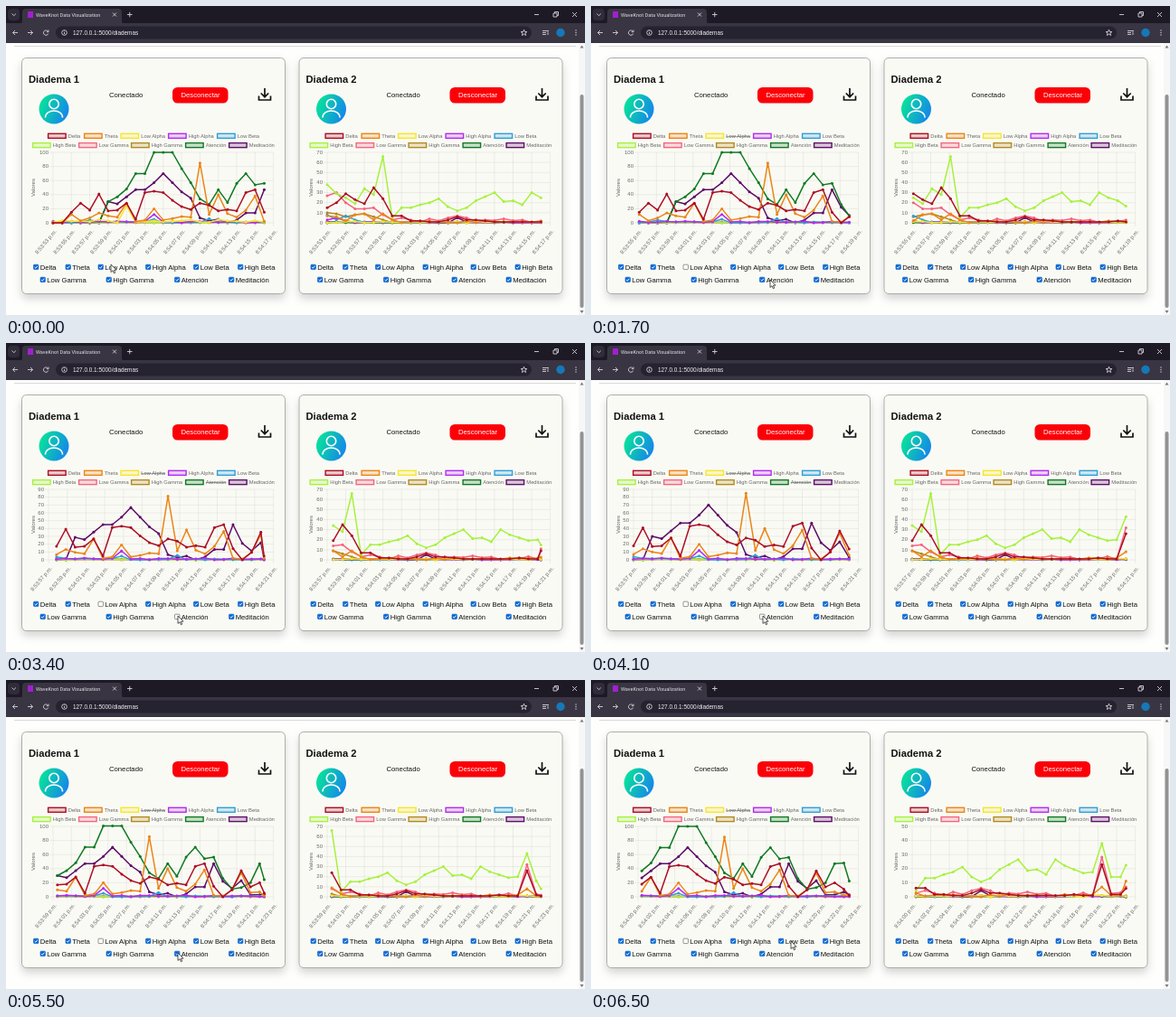
These frames come from a looping animation (640 px wide and 342 px high, 6600 ms). An HTML page with a canvas:

```html
<!DOCTYPE html>
<html lang="es">
<head>
<meta charset="utf-8">
<title>Diademas</title>
<style>
  html, body { margin: 0; width: 100%; height: 100%; overflow: hidden; background: #fff; }
  svg, canvas { position: absolute; left: 0; top: 0; width: 640px; height: 342px; }
  text { font-family: "Liberation Sans", Arial, sans-serif; fill: #111; }
  .tab { font: 5.6px Roboto, sans-serif; fill: #e2dfe6; }
  .url { font-size: 6.4px; fill: #f0eef2; }
  .icon { fill: none; stroke: #d5d1da; stroke-width: .9; }
  .title { font-size: 11.2px; font-weight: bold; }
  .body { font-size: 7.7px; }
  .legend { font-size: 5.8px; fill: #666; }
  .off .legend { text-decoration: line-through; }
  .tick { fill: none; stroke: #fff; stroke-width: 1; }
  .box { fill: #0b66d0; stroke: #0b66d0; stroke-width: .7; }
  .off .box { fill: #fff; stroke: #666; }
  .off .tick { visibility: hidden; }
  #cursor { animation: move 6.6s linear infinite; }
  @keyframes move {
    0% { transform: translate(116px, 286px); }
    6%, 13.6% { transform: translate(107px, 288px); }
    24%, 28% { transform: translate(198px, 303px); }
    36%, 86% { transform: translate(190px, 302px); }
    94%, 100% { transform: translate(221px, 289px); }
  }
</style>
</head>
<body>
<svg id="page" viewBox="0 0 640 342">
  <defs>
    <linearGradient id="teal" x1="0" x2="1" y1=".3" y2=".7">
      <stop offset=".1" stop-color="#08dca0"/><stop offset="1" stop-color="#1583ee"/>
    </linearGradient>
    <filter id="shade" x="-10%" y="-10%" width="120%" height="125%">
      <feDropShadow dx="0" dy="5" stdDeviation="5" flood-color="#000" flood-opacity=".17"/>
    </filter>
  </defs>
  <rect y="40" width="640" height="302" fill="#fefefc"/>
  <path d="M9 44.5H630" stroke="#d8d8d8"/>
  <g id="cards"></g>

  <rect width="640" height="20" fill="#1d1a26"/>
  <path d="M15 20Q18 20 18 16V7Q18 3 22 3H124Q128 3 128 7V16Q128 20 131 20Z" fill="#393542"/>
  <rect y="19" width="640" height="22" fill="#393542"/>
  <rect x="2" y="3" width="13" height="13" rx="4" fill="#302c3a"/>
  <rect x="55" y="22.500" width="526" height="14" rx="7" fill="#262330"/>
  <rect x="24" y="6" width="6" height="7" fill="#a21fd0"/>
  <text class="tab" x="33" y="11.500">WaveKnot Data Visualization</text>
  <text class="url" x="74" y="32">127.0.0.1:5000/diademas</text>
  <g class="icon">
    <path d="M6.500 8.500L8.700 10.700L10.900 8.500M118 7.500L122 11.500M122 7.500L118 11.500M134 9.500H139.500M136.750 6.800V12.200"/>
    <path d="M584 9.500H589M605 8H609V12H605ZM606.500 8V6.500H610.500V10.500H609M626 7L631 12M631 7L626 12"/>
    <path d="M13 29.500H7.500M10 27L7.500 29.500L10 32M24 29.500H29.500M27 27L29.500 29.500L27 32"/>
    <path d="M46.500 28.300A2.700 2.700 0 1 0 46.700 30.500M47 26.500V28.700H44.800"/>
    <circle cx="64.500" cy="29.500" r="2.800"/><path d="M64.500 29V31M64.500 27.500V28.200"/>
    <path d="M572.500 26.200L573.400 28.500L575.800 28.600L573.900 30.100L574.600 32.500L572.500 31.100L570.400 32.500L571.100 30.100L569.200 28.600L571.600 28.500Z"/>
    <path d="M593 27.500H600M593 29.500H597M593 31.500H597M599 32V28.500"/>
  </g>
  <circle cx="613" cy="29.500" r="4.700" fill="#1678b8"/>
  <g fill="#d5d1da"><circle cx="630" cy="27" r=".7"/><circle cx="630" cy="29.500" r=".7"/><circle cx="630" cy="32" r=".7"/></g>

  <rect x="633" y="41" width="7" height="301" fill="#f7f7f7"/>
  <rect x="634.500" y="98" width="4" height="236" rx="2" fill="#929292"/>
  <path d="M634.500 46.500L636.500 43.500L638.500 46.500ZM634.500 337L636.500 340L638.500 337Z" fill="#777"/>
</svg>
<canvas id="plot"></canvas>
<svg viewBox="0 0 640 342">
  <path id="cursor" d="M0 0V8.500L2 6.700L3.400 9.800L4.700 9.200L3.400 6.200H6Z" fill="#fff" stroke="#111" stroke-width=".7"/>
</svg>

<script>
const LOOP = 6.6, SHOWN = 24, BASE = 240, HEIGHT = 78;
const GAP = 306.5;

// name, colour, legend x, legend row, checkbox x
const SERIES = [
  ["Delta", "#ab0f25", 46, 0, 30.5],
  ["Theta", "#ec8514", 86, 0, 66],
  ["Low Alpha", "#f6e62c", 126.5, 0, 102],
  ["High Alpha", "#b22cf0", 179, 0, 154.5],
  ["Low Beta", "#2f9fd8", 233, 0, 207.5],
  ["High Beta", "#a6f23c", 29, 1, 256.5],
  ["Low Gamma", "#f4647f", 80, 1, 38],
  ["High Gamma", "#b18a1c", 138, 1, 111],
  ["Atención", "#0f7a22", 198, 1, 186.5],
  ["Meditación", "#5d0d68", 246, 1, 246.5]
];
const LOW_ALPHA = 2, ATENCION = 8;

// Low-level noise with a few peaks, given by position
const noise = (seed, amp, peaks = {}) => Array.from({ length: 31 }, (_, i) => {
  const r = Math.sin((i + 1) * seed) * 437.58;
  return peaks[i] ?? amp * (r - Math.floor(r));
});

const data1 = [
  [0, 0, 15, 28, 18, 41, 17, 18, 28, 5, 43, 45, 43, 32, 23, 19, 28, 25, 17, 19, 17, 43, 47, 15, 0, 10, 37, 14, 20, 11, 3],
  [0, 0, 12, 3, 7, 14, 10, 8, 28, 2, 4, 20, 4, 6, 9, 8, 85, 12, 40, 13, 8, 18, 38, 2, 1, 10, 34, 6, 7, 3, 3],
  noise(3.1, 5, { 8: 24 }),
  noise(1.7, 2.5, { 11: 12 }),
  noise(2.3, 2, { 4: 4, 11: 5, 17: 6 }),
  noise(4.9, 1),
  noise(5.3, 1),
  noise(6.1, 1.2),
  [0, 0, 0, 0, 0, 0, 30, 37, 48, 70, 70, 100, 100, 100, 77, 57, 34, 26, 47, 29, 56, 70, 54, 56, 26, 11, 13, 20, 47, 48, 38],
  [0, 0, 0, 0, 0, 0, 30, 27, 37, 47, 47, 57, 70, 57, 44, 35, 7, 3, 5, 0, 4, 14, 14, 47, 22, 12, 23, 3, 3, 7, 5]
];
const data2 = [
  [15, 20, 29, 23, 19, 35, 24, 7, 7, 2, 2, 1, 1, 3, 6, 3, 3, 2, 1, 1, 1, 1, 1, 1, 2, 1, 1, 26, 2, 2, 10],
  noise(2.9, 2, { 0: 7, 1: 6, 2: 2, 3: 8, 4: 9, 5: 3, 6: 9, 7: 3, 27: 8, 30: 19 }),
  noise(3.7, 1.5),
  noise(1.3, 1.2, { 0: 3, 1: 5, 2: 2 }),
  noise(4.3, 1, { 0: 8, 1: 3, 2: 7, 3: 3 }),
  [38, 29, 25, 19, 34, 28, 66, 5, 15, 15, 18, 20, 24, 16, 12, 15, 22, 26, 30, 21, 22, 18, 30, 25, 22, 19, 20, 43, 16, 16, 38],
  noise(1.9, 4, { 0: 27, 1: 30, 2: 20, 3: 14, 4: 14, 5: 15, 6: 8, 7: 3, 8: 5, 9: 3, 11: 4, 13: 5, 14: 7, 15: 5, 17: 3, 19: 4, 27: 32, 30: 12 }),
  noise(5.7, 1.5, { 0: 10, 1: 9, 2: 6, 3: 8, 4: 9, 5: 6, 6: 3 }),
  noise(6.7, .6),
  noise(7.1, 1, { 14: 5 })
];

const feed = [-2, .27, 1.3, 2.27, 3.3, 4.3, 5.34, 6.3].map((t, n) => ({ t, n }));
const toggles = [
  { t: .5, hidden: [LOW_ALPHA] },
  { t: 3.2, hidden: [LOW_ALPHA, ATENCION] },
  { t: 4.9, hidden: [LOW_ALPHA] }
];

// Each state carries over whatever its event leaves unchanged
function timeline(events, scale) {
  let state = { n: 0, hidden: [] };
  return events.sort((a, b) => a.t - b.t).map(e => {
    state = { ...state, ...e };
    return { ...state, ...scale(state) };
  });
}

const charts = [
  { right: 295.6, title: 32, data: data1, states: timeline([...feed, ...toggles],
      s => s.hidden.includes(ATENCION) ? { left: 47, max: 90, by: 10 } : { left: 52, max: 100, by: 20 }) },
  { right: 601.6, title: 338.5, data: data2, states: timeline([...feed],
      s => ({ left: 355, max: s.n > 6 ? 50 : 70, by: 10 })) }
];

// Static cards
function card(i) {
  const check = ([name, , , , x], k) => {
    const y = k < 6 ? 289 : 303;
    return `<g id="c${i}_${k}"><rect class="box" x="${x}" y="${y - 2.8}" width="5.4" height="5.4" rx=".8"/>
      <path class="tick" d="M${x + 1.1} ${y}l1.2 1.2l2.1-2.500"/>
      <text class="body" x="${x + 7.2}" y="${y + 2.8}">${name}</text></g>`;
  };
  const key = ([name, color, x, row], k) => {
    const y = 141.3 + row * 10.3;
    return `<g id="l${i}_${k}"><rect x="${x + .6}" y="${y}" width="19.500" height="5" fill="${color}" fill-opacity=".22" stroke="${color}" stroke-width="1.400"/>
      <text class="legend" x="${x + 22.8}" y="${y + 4.6}">${name}</text></g>`;
  };
  return `<g transform="translate(${i * GAP})">
    <rect x="17.500" y="57.500" width="291" height="261" rx="5" fill="#fafaf5" stroke="#9a9a9a" stroke-width=".8" filter="url(#shade)"/>
    <text class="title" x="25" y="85">Diadema ${i + 1}</text>
    <circle cx="53" cy="114" r="16.500" fill="url(#teal)"/>
    <g fill="none" stroke="#fff" stroke-width="1.600"><circle cx="53" cy="108.500" r="5.200"/><path d="M43.500 123.500C43.500 113.500 62.500 113.500 62.500 123.500"/></g>
    <text class="body" x="114" y="101">Conectado</text>
    <rect x="184" y="90" width="61.500" height="17.500" rx="5.500" fill="#fb0007"/>
    <text class="body" x="193.500" y="101.300" style="fill:#fff">Desconectar</text>
    <path d="M286 91V100M281.800 96.500L286 100.700L290.200 96.500M279.500 99.500V104H292.500V99.500" fill="none" stroke="#111" stroke-width="1.700"/>
    ${SERIES.map(key).join("")}${SERIES.map(check).join("")}</g>`;
}
document.getElementById("cards").innerHTML = card(0) + card(1);

const canvas = document.getElementById("plot"), g = canvas.getContext("2d");
const ratio = window.devicePixelRatio || 1;
canvas.width = 640 * ratio;
canvas.height = 342 * ratio;

const ease = u => 1 - (1 - Math.min(u, 1)) ** 4;

function place(chart, values, j, e, t) {
  const s = chart.states[e], step = (chart.right - s.left) / SHOWN;
  const x = s.left + (j - s.n) * step, y = BASE - values[j] * HEIGHT / s.max;
  if (e === 0) return [x, y];
  const isNew = j >= chart.states[e - 1].n + SHOWN;
  const [fx, fy] = isNew ? [x, BASE] : place(chart, values, j, e - 1, s.t);
  const u = ease(t - s.t);
  return [fx + (x - fx) * u, fy + (y - fy) * u];
}

function rotated(text, x, y, angle, align) {
  g.save();
  g.translate(x, y);
  g.rotate(angle);
  g.textAlign = align;
  g.fillText(text, 0, 0);
  g.restore();
}

function line(x1, y1, x2, y2) {
  g.beginPath();
  g.moveTo(x1, y1);
  g.lineTo(x2, y2);
  g.stroke();
}

function clock(n) {
  const s = 53 + n;
  return `8:${53 + Math.floor(s / 60)}:${String(s % 60).padStart(2, "0")} p.m.`;
}

function axes(chart, s) {
  const step = (chart.right - s.left) / SHOWN;
  g.font = '6px "Liberation Sans", Arial, sans-serif';
  g.textBaseline = "middle";
  g.fillStyle = "#666";
  g.strokeStyle = "rgba(0,0,0,.1)";
  g.lineWidth = .6;
  for (let v = 0; v <= s.max; v += s.by) {
    const y = BASE - v * HEIGHT / s.max;
    line(s.left - 4, y, chart.right, y);
    g.textAlign = "right";
    g.fillText(v, s.left - 5, y);
  }
  for (let k = 0; k <= SHOWN; k += 2) {
    const x = s.left + k * step;
    line(x, BASE - HEIGHT, x, BASE + 4);
    rotated(clock(s.n + k), x + 3, 248.5, -.87, "right");
  }
  rotated("Valores", chart.title - 1.5, 201, -Math.PI / 2, "center");
}

function curves(chart, s, e, t) {
  g.save();
  g.beginPath();
  g.rect(s.left - 2, BASE - HEIGHT - 2, chart.right - s.left + 4, HEIGHT + 4);
  g.clip();
  g.lineWidth = 1.5;
  g.lineJoin = "round";
  for (let k = SERIES.length - 1; k >= 0; k--) {
    if (s.hidden.includes(k)) continue;
    const pts = Array.from({ length: SHOWN }, (_, i) => place(chart, chart.data[k], s.n + i, e, t));
    g.strokeStyle = g.fillStyle = SERIES[k][1];
    g.beginPath();
    pts.forEach(p => g.lineTo(...p));
    g.stroke();
    for (const [x, y] of pts) {
      g.beginPath();
      g.arc(x, y, 1.5, 0, 7);
      g.fill();
    }
  }
  g.restore();
}

function draw(t) {
  g.setTransform(ratio, 0, 0, ratio, 0, 0);
  g.clearRect(0, 0, 640, 342);
  charts.forEach((chart, i) => {
    const e = chart.states.findLastIndex(s => s.t <= t), s = chart.states[e];
    axes(chart, s);
    curves(chart, s, e, t);
    for (const k of [LOW_ALPHA, ATENCION])
      for (const part of ["c", "l"])
        document.getElementById(`${part}${i}_${k}`).classList.toggle("off", s.hidden.includes(k));
  });
}

const start = performance.now();
function frame() {
  draw((performance.now() - start) / 1000 % LOOP);
  requestAnimationFrame(frame);
}
frame();
</script>
</body>
</html>
```
